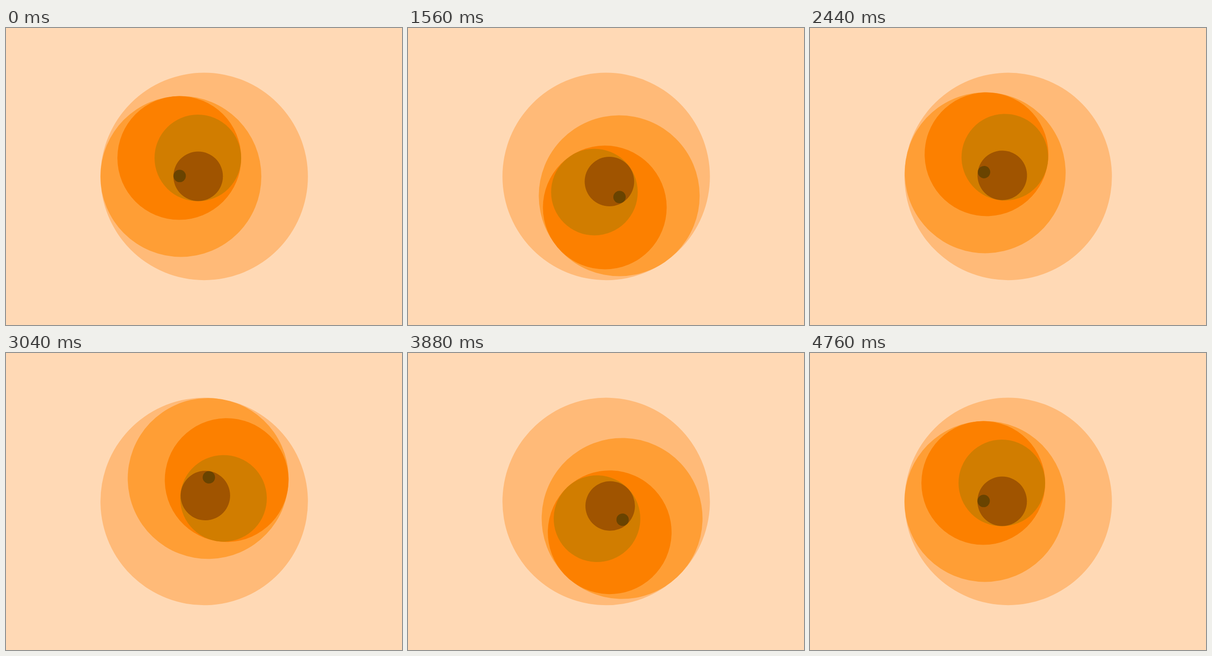
Recreate the animation shown at these times as an HTML page. Size 864 by 648 pixels, loop 4800 ms.

```html
<!DOCTYPE html>
<html lang="en">
<head>
<meta charset="utf-8">
<title>Nested circles</title>
<style>
  html, body { margin: 0; height: 100%; overflow: hidden; background: #ffd9b5; }
  svg { display: block; width: 100%; height: 100%; }
</style>
</head>
<body>
<svg viewBox="0 0 864 648"><g id="disc"></g></svg>
<script>
const STEP = 40, STEPS = 120, TURNS = 2;
const CENTER = [432.4, 323.9];
const disc = document.getElementById('disc');

// Each circle is placed by distance and angle from the one around it.
const circles = [
  { r: 226.3, dist: 0, angle: 0, fill: '#ffba78' },
  { r: 175.5, dist: 50.8, angle: 180, fill: '#ff9e35' },
  { r: 135, dist: 40.5, angle: 265, fill: '#fc8000' },
  { r: 94.5, dist: 40.5, angle: 0, fill: '#d17d00' },
  { r: 54, dist: 40, angle: 89, fill: '#a05400' },
  { r: 13.5, dist: 40.4, angle: 181, fill: '#694300' }
];

let [x, y] = CENTER;
for (const { r, dist, angle, fill } of circles) {
  const rad = angle * Math.PI / 180;
  x += dist * Math.cos(rad);
  y += dist * Math.sin(rad);
  const circle = document.createElementNS('http://www.w3.org/2000/svg', 'circle');
  for (const [name, value] of Object.entries({ cx: x, cy: y, r, fill })) {
    circle.setAttribute(name, value);
  }
  disc.append(circle);
}

// The first and last steps share one pose, so the turn spans STEPS - 1 intervals.
function draw() {
  const step = Math.floor((performance.now() + 1) / STEP) % STEPS;
  const angle = step * TURNS * 360 / (STEPS - 1);
  disc.setAttribute('transform', `rotate(${angle} ${CENTER})`);
  requestAnimationFrame(draw);
}
draw();
</script>
</body>
</html>
```
